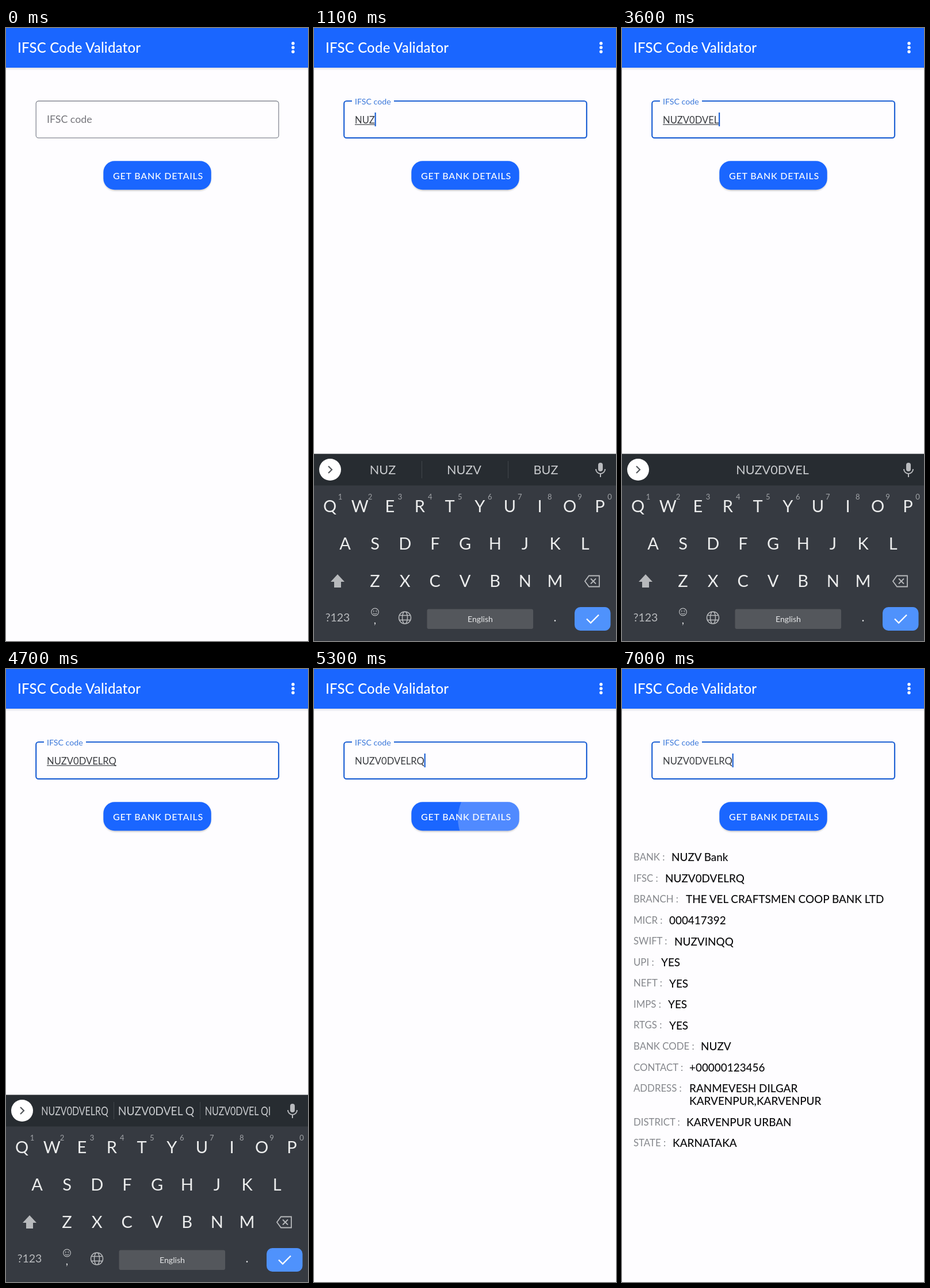
Recreate the animation shown at these times as an HTML page. Size 525 px wide and 1066 px high, loop 7.1 s.

```html
<!DOCTYPE html>
<html lang="en">
<head>
<meta charset="utf-8">
<title>IFSC Code Validator</title>
<style>
  html, body { margin: 0; width: 100%; height: 100%; overflow: hidden; background: #fefdff; }
  svg { display: block; width: 100%; height: 100%; font-family: Lato, "Open Sans", sans-serif; }
</style>
</head>
<body>
<svg id="stage" viewBox="0 0 525 1066" xmlns="http://www.w3.org/2000/svg"></svg>
<script>
const LOOP = 7100, BLUE = '#1a66ff', LINE = '#1f62d4', CODE = 'NUZV0DVELRQ';
const FOCUS = 60, HIDE = 4760, RIPPLE = 5244, RESULT = 5800;
const SYMBOLS = [1450, 1850];
const TYPED = [850, 950, 1050, 1250, 1670, 2030, 2630, 3250, 3450, 3870, 4170];
const BLINK = 460;

// Suggestion strips with three entries, by number of typed letters; others repeat the typed text.
const GUESSES = {
  1: ['N', 'NO', 'IN'],
  2: ['NU', 'NUN', 'NUT'],
  3: ['NUZ', 'NUZV', 'BUZ'],
  7: ['NUZV0DV', 'NUZV0D V', 'NUZV0DB'],
  8: ['NUZV0DVE', 'NUZV0D VE', 'NUZV0DBE'],
  11: [CODE, 'NUZV0DVEL Q', 'NUZV0DVEL QI']
};

// label, x of the value, lines of the value
const DETAILS = [
  ['BANK', 86, 'NUZV Bank'],
  ['IFSC', 75, CODE],
  ['BRANCH', 111, 'THE VEL CRAFTSMEN COOP BANK LTD'],
  ['MICR', 82, '000417392'],
  ['SWIFT', 91, 'NUZVINQQ'],
  ['UPI', 68, 'YES'],
  ['NEFT', 82, 'YES'],
  ['IMPS', 80, 'YES'],
  ['RTGS', 82, 'YES'],
  ['BANK CODE', 137, 'NUZV'],
  ['CONTACT', 117, '+00000123456'],
  ['ADDRESS', 117, 'RANMEVESH DILGAR', 'KARVENPUR,KARVENPUR'],
  ['DISTRICT', 112, 'KARVENPUR URBAN'],
  ['STATE', 88, 'KARNATAKA']
];

const stage = document.getElementById('stage');
const pen = document.createElement('canvas').getContext('2d');
const clamp = v => Math.max(0, Math.min(1, v));
const mix = (a, b, p) => a + (b - a) * p;
const easeOut = p => 1 - (1 - p) ** 2;
const escape = s => String(s).replace(/&/g, '&amp;').replace(/</g, '&lt;');

const text = (s, x, y, size, fill, weight = 400, more = '') =>
  `<text x="${x}" y="${y}" font-size="${size}" fill="${fill}" font-weight="${weight}" ${more}>${escape(s)}</text>`;
const mid = (s, x, y, size, fill, more = '') =>
  text(s, x, y, size, fill, 400, 'text-anchor="middle" ' + more);
const box = (x, y, w, h, fill, rx = 0, more = '') =>
  `<rect x="${x}" y="${y}" width="${w}" height="${h}" rx="${rx}" fill="${fill}" ${more}/>`;
const dot = (x, y, r, fill, more = '') => `<circle cx="${x}" cy="${y}" r="${r}" fill="${fill}" ${more}/>`;
const stroke = (d, color, width) => `<path d="${d}" fill="none" stroke="${color}" stroke-width="${width}"/>`;

function measure(s) {
  pen.font = '400 16.6px Lato, "Open Sans", sans-serif';
  return pen.measureText(s).width;
}

const DEFS = `<defs>
  <linearGradient id="fade" x2="0" y2="1"><stop stop-color="#000" stop-opacity=".11"/><stop offset="1" stop-color="#000" stop-opacity="0"/></linearGradient>
  <filter id="soft" x="-10%" y="-30%" width="120%" height="170%"><feGaussianBlur stdDeviation="1.5"/></filter>
  <clipPath id="button"><rect x="169.3" y="231.3" width="187.4" height="50" rx="19.5"/></clipPath>
</defs>`;

function header() {
  return box(0, 0, 525, 1066, '#fefdff') + box(0, 69, 525, 5, 'url(#fade)') + box(0, 0, 525, 69, BLUE) +
    text('IFSC Code Validator', 20, 42.5, 24, '#fff', 500, 'letter-spacing=".2"') +
    [26.7, 34, 41.3].map(y => dot(499, y, 2.7, '#fff')).join('');
}

function field(t, n) {
  const p = clamp((t - FOCUS) / 170), active = t >= FOCUS;
  const typed = CODE.slice(0, n), end = 71 + measure(typed);
  let out = box(52.2, 127, 421.8, 64.2, 'none', 4.5,
    active ? `stroke="${LINE}" stroke-width="2.2"` : 'stroke="#858993" stroke-width="1.3"');
  if (active) out += box(66, 123, 73 * p, 8, '#fefdff');
  out += text('IFSC code', 71, mix(165, 132.5, p), mix(17.8, 14.2, p), active ? '#3b78da' : '#75757b');
  if (n) out += text(typed, 71, 166, 16.6, '#3a3c40');
  if (n && t < HIDE + 90) out += box(71, 167.3, end - 71, 1.2, '#3a3c40');
  const since = t - (n ? TYPED[n - 1] : FOCUS);
  if (active && since % (2 * BLINK) < BLINK) out += box(end - 0.3, 147, 2.2, 24, LINE);
  return out;
}

function button(t) {
  let out = box(170, 233, 186, 50, '#000', 19.5, 'opacity=".22" filter="url(#soft)"') +
    box(169.3, 231.3, 187.4, 50, BLUE, 19.5);
  if (t > RIPPLE) {
    const r = 165 * easeOut(clamp((t - RIPPLE) / 225));
    const alpha = 0.235 * (1 - clamp((t - 5500) / 500));
    out += dot(322, 260, r, '#fff', `opacity="${alpha}" clip-path="url(#button)"`);
  }
  return out + text('GET BANK DETAILS', 186, 263, 16, '#fff', 500, 'letter-spacing=".8"');
}

function details() {
  let y = 333.5, out = '';
  for (const [label, x, ...lines] of DETAILS) {
    out += text(label + ' :', 20, y - 0.5, 16.8, '#85878c');
    lines.forEach((line, i) => out += text(line, x, y + 0.8 + 22 * i, 18.9, '#0c0c0e', 500));
    y += 36.55 + 22 * (lines.length - 1);
  }
  return out;
}

function strip(n) {
  let out = box(0, 740.5, 525, 55, '#272c31') + dot(28, 768, 19, '#fff') +
    stroke('M25 762l6 6l-6 6', '#54585c', 2.2) +
    box(494, 756, 8, 15, '#b9bbbe', 4) +
    stroke('M490 767a8 8 0 0 0 16 0M498 775v6', '#b9bbbe', 2);
  if (!n) return out;
  const word = (s, x, squeeze) =>
    mid(s, 0, 0, 21.6, '#c9cbce', `transform="translate(${x} 776) scale(${s.length > 9 ? squeeze : 1} 1)"`);
  const three = GUESSES[n];
  if (!three) return out + word(CODE.slice(0, n), 261.5, 1);
  return out + [187, 337].map(x => box(x, 753, 1, 30, '#41464c')).join('') +
    word(three[0], 119.5, 0.74) + word(three[1], 261, 0.89) + word(three[2], 403, 0.74);
}

function row(keys, x, y, size = 29) {
  return [...keys].map((k, i) => mid(k, x + 52.15 * i, y, size, '#eceded')).join('');
}

function keyboard(t, n) {
  const symbols = t >= SYMBOLS[0] && t < SYMBOLS[1];
  const grey = '#b7b9bc';
  let out = box(0, 795, 525, 271, '#363a41') + strip(n);
  if (symbols) {
    out += row('1234567890', 27.5, 842, 27) + row('@#₹_&-+()/', 27.5, 907, 26) +
      row('*"\':;!?', 106, 972, 26) + mid('=\\<', 41, 969, 19, grey);
  } else {
    out += row('QWERTYUIOP', 27.5, 842) + row('ASDFGHJKL', 54, 907) + row('ZXCVBNM', 106, 972) +
      [...'1234567890'].map((k, i) => mid(k, 45.5 + 52.05 * i, 820, 13, '#a0a3a7')).join('') +
      `<path d="M41 950L53 963H47V973H35V963H29Z" fill="${grey}"/>`;
  }
  // backspace
  out += stroke('M478 952.5H496V971.5H478L471 962ZM481 957.5l9 9m0-9l-9 9', grey, 1.8);
  if (t >= SYMBOLS[1] && t < SYMBOLS[1] + 110) out += box(6, 1002, 71, 47.5, '#464a50', 2);
  out += mid(symbols ? 'ABC' : '?123', 41, 1032, 19.5, grey);
  // smiley, comma and globe
  out += dot(106, 1015.5, 6.3, 'none', `stroke="${grey}" stroke-width="1.2"`) +
    dot(103.7, 1014, 1, grey) + dot(108.3, 1014, 1, grey) +
    stroke('M102.8 1017.3q3.2 3.6 6.4 0', grey, 1.1) + mid(',', 106, 1036, 19, '#e0e1e2') +
    stroke('M147.5 1025.5a10.5 10.5 0 1 0 21 0a10.5 10.5 0 1 0-21 0M153.5 1025.5a4.5 10.5 0 1 0 9 0a4.5 10.5 0 1 0-9 0M149 1021.5h18M149 1029.5h18', grey, 1.5);
  out += box(196.5, 1010.5, 184.5, 34.5, '#54575c', 3) + mid('English', 289, 1033, 14.2, '#e6e7e8') +
    mid('.', 419, 1032, 21, '#e6e7e8');
  out += box(453, 1007, 62.5, 41, t > HIDE - 40 ? '#70a6fc' : '#4f92fc', 10) +
    stroke('M474 1027.5l7 7l14-14', '#fff', 2.3);
  const rise = easeOut(clamp((t - FOCUS) / 320)), fall = clamp((t - HIDE) / 130) ** 2;
  return `<g transform="translate(0 ${326 * (1 - rise + fall)})">${out}</g>`;
}

function scene(t) {
  const n = TYPED.filter(at => at <= t).length;
  return DEFS + header() + field(t, n) + button(t) +
    (t >= RESULT ? details() : '') +
    (t >= FOCUS && t < HIDE + 130 ? keyboard(t, n) : '');
}

let start, shown;
function tick(now) {
  start ??= now;
  const next = scene((now - start) % LOOP);
  if (next !== shown) stage.innerHTML = shown = next;
  requestAnimationFrame(tick);
}
requestAnimationFrame(tick);
</script>
</body>
</html>
```
